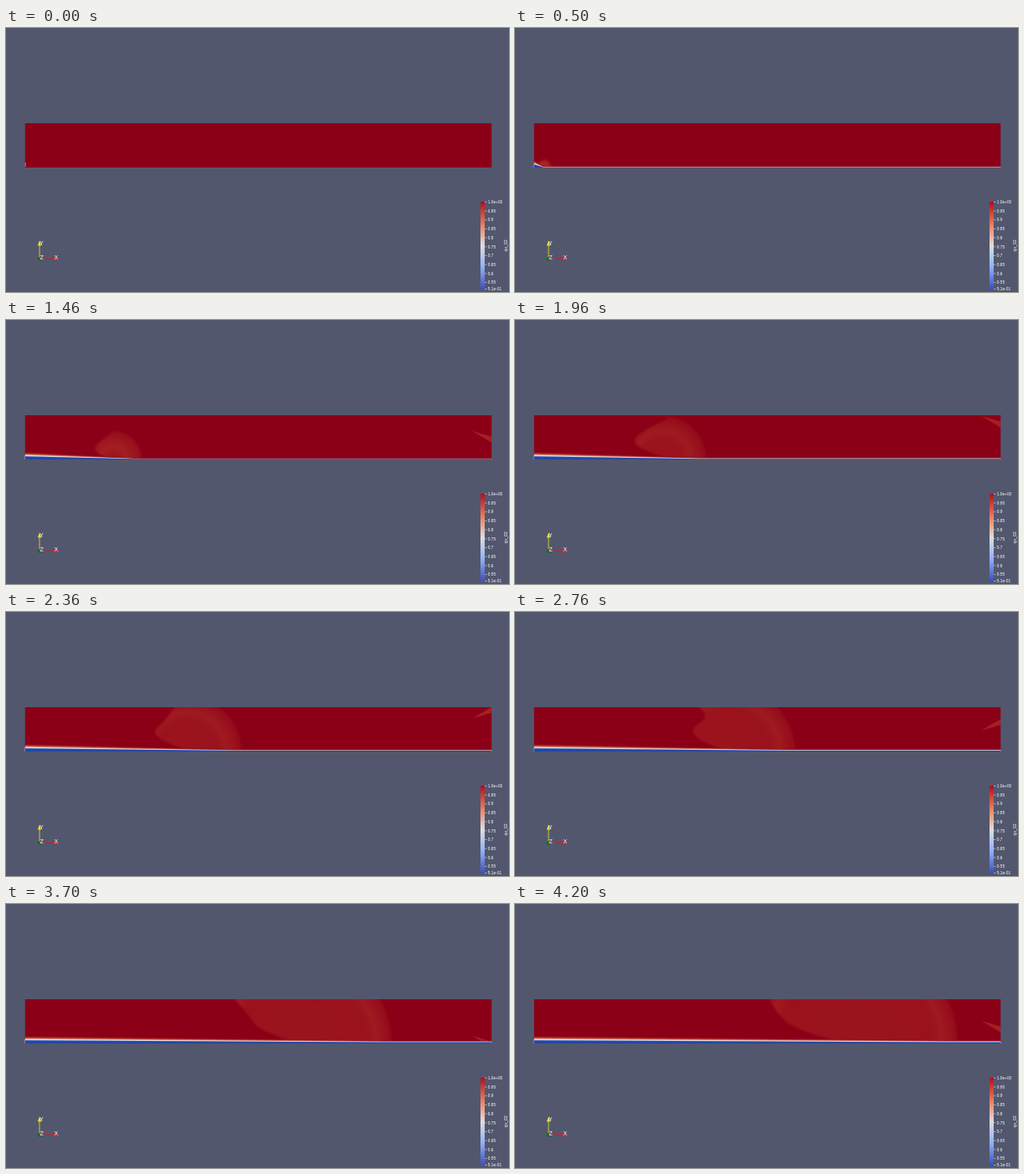
These frames come from a looping animation (600x316 px, 4260 ms). An HTML page with a canvas:

```html
<!DOCTYPE html>
<html lang="en">
<head>
<meta charset="utf-8">
<title>Channel flow</title>
<style>
  html, body { margin: 0; width: 100%; height: 100%; overflow: hidden; background: #52576e; }
  canvas, svg { position: absolute; left: 0; top: 0; display: block; }
  text { font-family: "Liberation Sans", Arial, sans-serif; fill: #fff; }
</style>
</head>
<body>
<canvas id="field" width="600" height="316"></canvas>
<svg width="600" height="316" viewBox="0 0 600 316">
  <defs>
    <linearGradient id="scale" x2="0" y2="1">
      <stop offset="0" stop-color="#b00d20"/>
      <stop offset=".12" stop-color="#cf4237"/>
      <stop offset=".3" stop-color="#ee8d70"/>
      <stop offset=".5" stop-color="#dddddd"/>
      <stop offset=".75" stop-color="#8fb0f5"/>
      <stop offset="1" stop-color="#3b4cc0"/>
    </linearGradient>
  </defs>
  <g>
    <path d="M40 276V260" stroke="#c9c832"/>
    <path d="M37.8 260.5L40 254.500L42.200 260.500Z" fill="#e6e02c"/>
    <path d="M40 276.500H57" stroke="#c8202c"/>
    <path d="M56.500 274.300L62 276.500L56.500 278.700Z" fill="#e01c24"/>
    <circle cx="39.500" cy="276.500" r="2.300" fill="#1c6a2c"/>
    <g font-size="7">
      <text x="40" y="259.500">Y</text>
      <text x="40.500" y="276.500">Z</text>
      <text x="57.500" y="276.500">X</text>
    </g>
  </g>
  <rect x="566" y="208" width="5" height="105" fill="url(#scale)"/>
  <g id="labels" font-size="4.8"></g>
  <text transform="translate(597.500 267.500) rotate(-90)" font-size="5.200">qv_02</text>
</svg>
<script>
const ctx = document.getElementById('field').getContext('2d');
const LEFT = 22.5, RIGHT = 579.5, TOP = 114, BOTTOM = 167, LOOP = 4260;

// Colour scale labels, from the top down
const labels = ['1.0e+00', '0.95', '0.9', '0.85', '0.8', '0.75', '0.7', '0.65', '0.6', '0.55', '5.1e-01'];
document.getElementById('labels').innerHTML = labels.map((s, i) => {
  const y = i === 10 ? 312.5 : 208.3 + i * 10.7;
  return `<path d="M571 ${y}h2.500" stroke="#fff" stroke-width=".5"/><text x="574.800" y="${y + 1.7}">${s}</text>`;
}).join('');

// step, wave front x, wave radius, then the rear outline from floor to top
const wave = [
  [0, 24, 2, 23, 167, 23, 166, 23, 165, 23, 165],
  [10, 44, 10, 24, 165, 28, 162, 31, 159, 34, 157],
  [18, 88, 19, 40, 164, 55, 161, 64, 154, 69, 148],
  [29, 162, 34, 118, 164, 104, 157, 109, 147, 126, 135],
  [39, 228, 52, 180, 165, 139, 152, 147, 134, 183, 118],
  [55, 334, 78, 250, 165, 198, 148, 237, 122, 216, 113],
  [64, 392, 92, 300, 165, 258, 150, 264, 126, 240, 113],
  [84, 528, 122, 385, 164, 345, 154, 314, 136, 303, 113]
];

// Nested near-wall layers, outermost first: height and colour
const layers = [
  [9, '#970a1c'], [8, '#a52822'], [7.1, '#bd5640'], [6.2, '#d9937a'],
  [5.3, '#eadfd6'], [4.3, '#a9bfe0'], [3.7, '#2447a8']
];

const ramp = (k, end) => Math.min(1, k / end);

function poseAt(k) {
  let i = 1;
  while (i < wave.length - 1 && wave[i][0] < k) i++;
  const a = wave[i - 1], b = wave[i], f = (k - a[0]) / (b[0] - a[0]);
  return a.map((v, j) => v + (b[j] - v) * f);
}

function polygon(points, fill) {
  ctx.fillStyle = fill;
  ctx.beginPath();
  points.forEach(p => ctx.lineTo(...p));
  ctx.fill();
}

function drawWave(k) {
  const [, front, r, x0, y0, x1, y1, x2, y2, x3, y3] = poseAt(k);
  const cx = front - r, alpha = 0.33 + 0.3 * Math.max(0, 1 - k / 36);
  const tint = a => `rgba(196,72,48,${a * ramp(k, 8)})`;
  const fill = ctx.createRadialGradient(cx, BOTTOM, 0, cx, BOTTOM, r);
  const inner = Math.max(0.1, 1 - 28 / r);
  fill.addColorStop(0, tint(alpha * 0.85));
  fill.addColorStop(inner, tint(alpha * 0.8));
  fill.addColorStop(inner + (1 - inner) * 0.35, tint(alpha * 1.1));
  fill.addColorStop(1, tint(alpha * 0.45));
  ctx.filter = 'blur(1px)';
  ctx.fillStyle = fill;
  ctx.beginPath();
  ctx.moveTo(x0, y0);
  ctx.quadraticCurveTo(x1, y1, (x1 + x2) / 2, (y1 + y2) / 2);
  ctx.quadraticCurveTo(x2, y2, x3, y3);
  ctx.arc(cx, BOTTOM, r, -Math.PI / 2, 0);
  ctx.fill();
  ctx.filter = 'none';
}

// Outlet streak that bounces between floor and ceiling
function drawStreak(k) {
  const span = BOTTOM - TOP, p = 1.8 * (k - 10);
  const wedge = (y, dir) =>
    polygon([[556, y], [RIGHT, y + 7 * dir], [RIGHT, y + 14 * dir]], 'rgba(196,72,48,.45)');
  wedge(BOTTOM - p, 1);
  wedge(TOP + p - span, -1);
  wedge(BOTTOM - p + 2 * span, 1);
}

function drawLayers(k) {
  const near = ramp(k, 10), far = (0.04 + 0.38 * k / 84) * ramp(k, 12);
  const bend = Math.max(LEFT + 4, poseAt(k)[1] - 10);
  for (const [h, colour] of layers) {
    polygon([[LEFT, BOTTOM], [LEFT, BOTTOM - h * near], [bend, BOTTOM - h * far],
      [RIGHT, BOTTOM - h * far], [RIGHT, BOTTOM]], colour);
  }
}

function draw(k) {
  ctx.fillStyle = '#52576e';
  ctx.fillRect(0, 0, 600, 316);
  ctx.save();
  ctx.beginPath();
  ctx.rect(LEFT, TOP, RIGHT - LEFT, BOTTOM - TOP);
  ctx.clip();
  ctx.fillStyle = '#8b0017';
  ctx.fillRect(LEFT, TOP, RIGHT - LEFT, BOTTOM - TOP);
  if (k) {
    drawWave(k);
    drawStreak(k);
    drawLayers(k);
  }
  if (k < 3) {
    ctx.fillStyle = '#d9a58c';
    ctx.fillRect(LEFT, 161, 1, 5);
  }
  ctx.restore();
}

// Steps alternate between 60 and 40 ms
function tick() {
  const t = performance.now() % LOOP;
  draw(Math.min(84, 2 * Math.floor(t / 100) + (t % 100 >= 60 ? 1 : 0)));
  requestAnimationFrame(tick);
}
tick();
</script>
</body>
</html>
```
